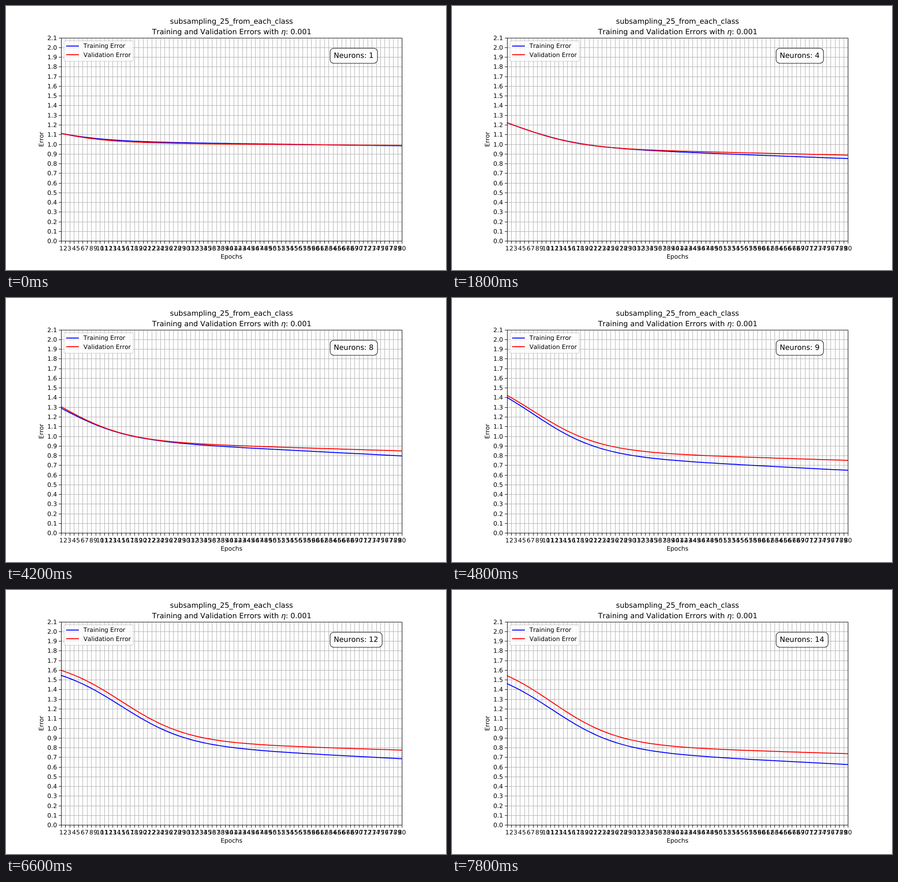
These frames come from a looping animation (966 by 580 pixels, 8000 ms). An HTML page:

```html
<!DOCTYPE html>
<html lang="en">
<head>
<meta charset="utf-8">
<title>Training and validation errors</title>
<style>
  html, body { margin: 0; width: 100%; height: 100%; overflow: hidden; background: #fff; }
  svg {
    display: block; width: 966px; height: 580px;
    font: 13.333px "DejaVu Sans", sans-serif;
    font-kerning: none; text-rendering: geometricPrecision;
  }
  .big { font-size: 16px; }
  .mid { text-anchor: middle; }
  .end { text-anchor: end; }
  .curve { fill: none; stroke-width: 2; stroke-linejoin: round; stroke-linecap: square; }
  .train { stroke: #00f; }
  .valid { stroke: #f00; }
</style>
</head>
<body>
<svg id="chart" viewBox="0 0 966 580"></svg>
<script>
const STEP = 600, LOOP = 8000, EPOCHS = 80, RATE = .13;
const BOX = { l: 120.75, r: 869.4, t: 69.6, b: 516.2 };

// Training error per neuron count: start, epochs until half the drop is done, end
const RUNS = [
  [1.112, 6.5, .983], [1.19, 8.5, .88], [1.238, 9.1, .846], [1.22, 9, .851], [1.2, 9.3, .858],
  [1.163, 9.6, .824], [1.3, 10, .616], [1.29, 8.3, .796], [1.4, 11, .647], [1.432, 11.4, .777],
  [1.45, 13, .669], [1.546, 16.1, .684], [1.5, 14.8, .69], [1.46, 13.6, .624]
];

const svg = document.getElementById('chart');
const px = e => BOX.l + (e - 1) * (BOX.r - BOX.l) / (EPOCHS - 1);
const py = v => BOX.b - v * (BOX.b - BOX.t) / 2.1;
const snap = v => Math.round(v) + .5;

function add(tag, attrs, text) {
  const el = document.createElementNS('http://www.w3.org/2000/svg', tag);
  for (const k in attrs) el.setAttribute(k, attrs[k]);
  if (text) el.textContent = text;
  return svg.appendChild(el);
}
const label = (x, y, text, cls = '') => add('text', { x, y, class: cls }, text);
const path = (d, attrs) => add('path', { d, fill: 'none', ...attrs });

// A logistic drop from start that settles on a slowly falling straight tail
function curve(start, half, end, rise) {
  const q = Math.exp(RATE * half) - 2;
  const pts = [];
  for (let t = 0; t < EPOCHS; t++) {
    const tail = end + rise * (1 - t / (EPOCHS - 1));
    const drop = (1 + q) / (q + Math.exp(RATE * t));
    const v = tail + (start - end - rise) * drop;
    pts.push(px(t + 1).toFixed(2) + ' ' + py(v).toFixed(2));
  }
  return 'M' + pts.join('L');
}

// Validation lies above training; the gap grows with neurons and with learning
function curves(n) {
  const [start, half, end] = RUNS[n - 1];
  const rise = Math.min(.18, .36 * (start - end));
  const learned = 1 - end;
  const gap = .2 * learned + .26 * learned ** 2;
  return [
    curve(start, half, end, rise),
    curve(start + 3e-5 * n ** 3, half, end + gap, .6 * rise)
  ];
}

// Grid and ticks
let grid = '', ticks = '';
const [left, right, top_, bottom] = [BOX.l, BOX.r, BOX.t, BOX.b].map(snap);
for (let e = 1; e <= EPOCHS; e++) {
  const x = snap(px(e));
  grid += `M${x} ${top_}V${bottom}`;
  ticks += `M${x} ${bottom}v5`;
}
for (let i = 0; i <= 21; i++) {
  const y = snap(py(i / 10));
  grid += `M${left} ${y}H${right}`;
  ticks += `M${left} ${y}h-5`;
}
path(grid, { stroke: '#b0b0b0', 'stroke-width': 1.07 });

const clip = add('clipPath', { id: 'area' });
clip.appendChild(add('rect', { x: BOX.l, y: BOX.t, width: BOX.r - BOX.l, height: BOX.b - BOX.t }));
const lines = ['train', 'valid'].map(c => path('', { class: 'curve ' + c, 'clip-path': 'url(#area)' }));

path(ticks + `M${left} ${top_}H${right}V${bottom}H${left}Z`,
  { stroke: '#000', 'stroke-width': 1.07, 'stroke-linecap': 'square' });

for (let e = 1; e <= EPOCHS; e++) label(Math.round(px(e) - 4.24 * String(e).length), 537, e);
for (let i = 0; i <= 21; i++) label(112, Math.round(py(i / 10) + 5), (i / 10).toFixed(1), 'end');
label(495.1, 555, 'Epochs', 'mid');
add('text', { class: 'mid', transform: 'translate(82 293) rotate(-90)' }, 'Error');

// Title
label(495.1, 39, 'subsampling_25_from_each_class', 'big mid');
label(495.6, 62, '', 'big mid').innerHTML =
  'Training and Validation Errors with <tspan font-style="italic">η</tspan>: 0.001';

// Legend
add('rect', { x: 127.5, y: 76.5, width: 152, height: 45, rx: 2.7, fill: '#fff', stroke: '#ccc', 'stroke-width': 1.33, opacity: .8 });
[['train', 'Training Error', 88], ['valid', 'Validation Error', 107]].forEach(([c, text, y], i) => {
  path(`M133 ${y}H159`, { class: 'curve ' + c });
  label(170, 92 + 20 * i, text);
});

// Neuron counter
const badge = add('rect', { x: 711.6, y: 92.9, height: 33, rx: 8, fill: '#fff', stroke: '#000', 'stroke-width': 1.33, opacity: .8 });
const count = label(719.5, 114, '', 'big');

let shown = 0;
function show(n) {
  if (n === shown) return;
  shown = n;
  curves(n).forEach((d, i) => lines[i].setAttribute('d', d));
  badge.setAttribute('width', n < 10 ? 104 : 114.2);
  count.textContent = 'Neurons: ' + n;
}

const t0 = performance.now();
function tick() {
  show(1 + Math.floor((performance.now() - t0) % LOOP / STEP));
  requestAnimationFrame(tick);
}
tick();
</script>
</body>
</html>
```
